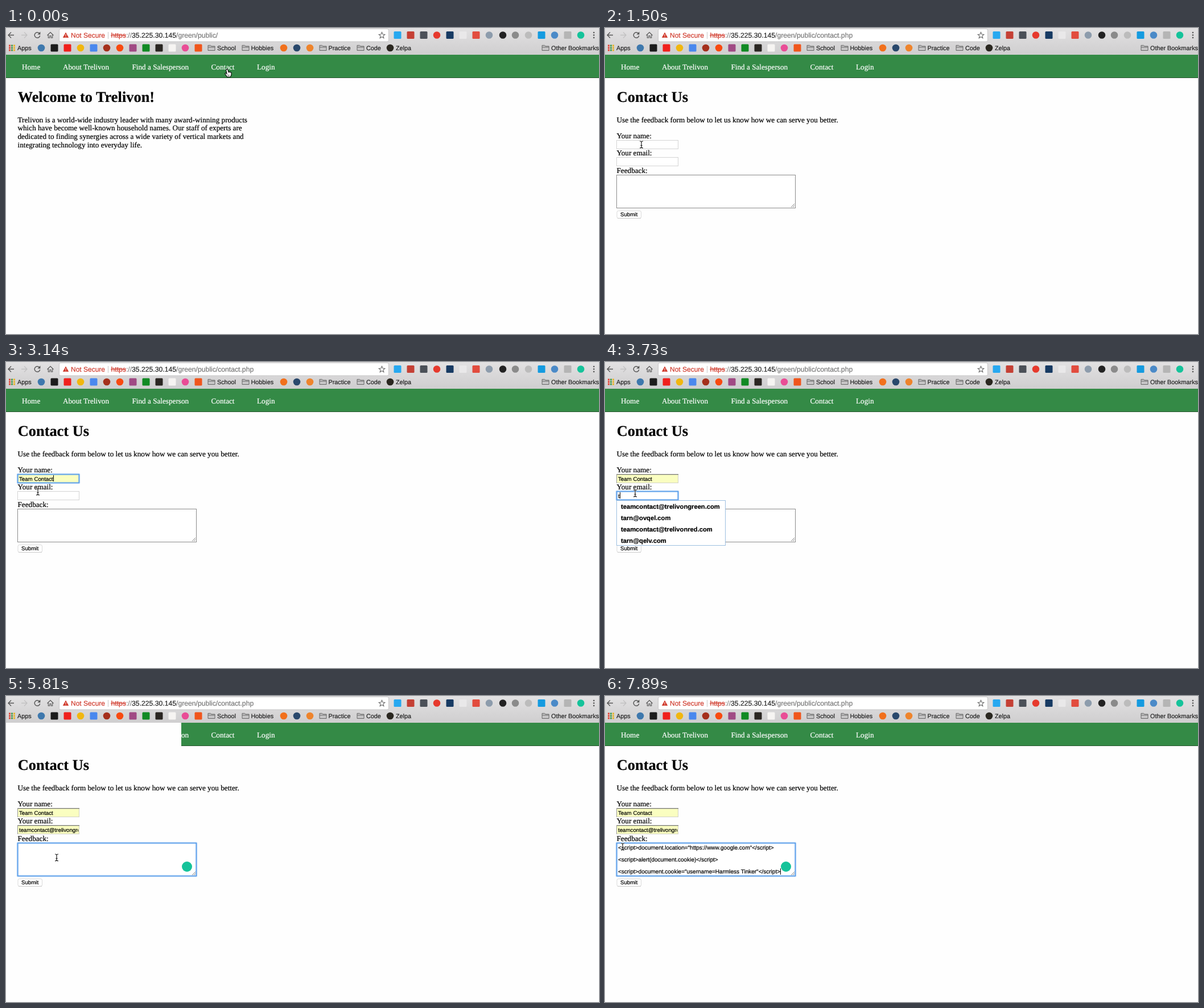
These frames come from a looping animation (1042x538 px, 8000 ms). An HTML page with a canvas:

```html
<!DOCTYPE html>
<html lang="en">
<head>
<meta charset="utf-8">
<title>Contact form</title>
<style>
  html, body { margin: 0; width: 100%; height: 100%; overflow: hidden; background: #fff; }
  canvas { display: block; }
</style>
</head>
<body>
<canvas id="stage" width="1042" height="538"></canvas>
<script>
const c = document.getElementById('stage').getContext('2d');
c.textRendering = 'geometricPrecision';
const LOOP = 8000;
const SERIF = '"Liberation Serif", serif', SANS = '"Liberation Sans", sans-serif';
const BODY = '13.2px ' + SERIF, HEAD = 'bold 26.4px ' + SERIF;
const URL_FONT = '12.2px ' + SANS, MARK = '10.8px ' + SANS;
const FIELD = '9.7px ' + SANS, CODE = '10px ' + SANS, MENU = 'bold 11.2px ' + SANS;
const YELLOW = '#fafec0', RING = '#5b9fea', MINT = '#15c39a';

const NAME = 'Team Contact', EMAIL = 'teamcontact@trelivongreen.com';
const NAMES = [NAME, 'team'];
const EMAILS = [EMAIL, 'tarn@ovqel.com', 'teamcontact@trelivonred.com', 'tarn@qelv.com'];
const INTRO = [
  'Trelivon is a world-wide industry leader with many award-winning products',
  'which have become well-known household names. Our staff of experts are',
  'dedicated to finding synergies across a wide variety of vertical markets and',
  'integrating technology into everyday life.'];
const SCRIPTS = [
  '<script>document.location="https://www.google.com"<\/script>',
  '<script>alert(document.cookie)<\/script>',
  '<script>document.cookie="username=Harmless Tinker"<\/script>'];

// pointer: start time, x, y, shape
const POINTER = [
  [0, 390, 79, hand], [470, 290, 150, arrow], [620, 131, 305, arrow],
  [910, 118, 288, beam], [1060, 96, 265, beam], [1200, 76, 222, arrow],
  [1350, 66, 207, beam], [1500, 64, 205, beam],
  [2690, 63, 214, arrow], [2840, 62, 222, arrow], [3130, 56, 228, beam], [3280, 53, 231, beam],
  [3880, 54, 238, beam], [4030, 54, 243, beam], [4180, 55, 248, arrow], [4330, 57, 252, arrow],
  [4630, 58, 254, beam], [4920, 62, 261, beam], [5070, 72, 271, beam], [5220, 82, 279, beam],
  [5360, 88, 283, beam], [5510, 89, 284, beam],
  [7300, 84, 281, beam], [7450, 70, 275, beam], [7590, 50, 268, beam],
  [7740, 36, 266, beam], [7890, 31, 265, beam]];

// a hairline outline gives the text its slightly heavier weight
function text(s, x, y, font, color = '#000') {
  c.font = font;
  c.fillStyle = c.strokeStyle = color;
  c.lineWidth = .2;
  c.fillText(s, x, y);
  c.strokeText(s, x, y);
  return x + c.measureText(s).width;
}
function box(x, y, w, h, color) {
  c.fillStyle = color;
  c.fillRect(x, y, w, h);
}
function frame(x, y, w, h, color, width = 1) {
  c.strokeStyle = color;
  c.lineWidth = width;
  c.strokeRect(x, y, w, h);
}
function round(x, y, w, h, r, fill, stroke) {
  c.beginPath();
  c.roundRect(x, y, w, h, r);
  c.fillStyle = fill;
  c.fill();
  if (stroke) { c.strokeStyle = stroke; c.lineWidth = 1; c.stroke(); }
}
function dot(x, y, r, color) {
  c.beginPath();
  c.arc(x, y, r, 0, 7);
  c.fillStyle = color;
  c.fill();
}
function path(d, x, y, stroke, width = 1, fill) {
  c.save();
  c.translate(x, y);
  const p = new Path2D(d);
  if (fill) { c.fillStyle = fill; c.fill(p); }
  if (stroke) { c.strokeStyle = stroke; c.lineWidth = width; c.stroke(p); }
  c.restore();
}

function hand(x, y) {
  path('M-2.5-6.5Q-1-7.5-.3-6L.8-2Q2-3 2.8-1.8Q4-2.5 4.5-1.2Q6-1.5 6 .5V3L4.5 7H-1.5L-5 1.5Q-5.3 0-3.6 .2L-2 1.6L-3.3-5Z',
    x, y, '#000', 1.1, '#fff');
  path('M.8-2L1.2 0M2.8-1.8L3.2 0M0 3V5.5M2 3V5.5', x, y, '#000', .7);
}
function arrow(x, y) {
  path('M0 0V11.5L2.7 9L4.6 13L6.5 12.2L4.7 8.3H8.4Z', x, y, '#fff', 1, '#000');
}
function beam(x, y) {
  const d = 'M-3-6Q-.5-6 0-4.5Q.5-6 3-6M0-4.5V4.5M-3 6Q-.5 6 0 4.5Q.5 6 3 6M-1.5 1.5H1.5';
  path(d, x, y, '#fff', 2.2);
  path(d, x, y, '#111', 1.1);
}

function folder(x) {
  path('M-6-4.5H-1.5L0-3H6V4.5H-6ZM-6-1.3H6', x, 35, '#666', 1, '#c6c5c6');
}
// plain stand-ins: [x, colour, 1 for a circle]
const BOOKMARKS = [
  [62, '#3e78ad', 1], [85, '#1c1c1c'], [108, '#f0201c'], [131, '#f1b70f', 1], [154, '#4a88ee'],
  [177, '#a5301c', 1], [200, '#f84a10', 1], [223, '#a04a84'], [246, '#118a24'], [269, '#2a2622'],
  [292, '#f6f4f2'], [315, '#e94d96', 1], [338, '#f0561c'], [488, '#f1701c', 1],
  [511, '#29486c', 1], [534, '#ee842c', 1], [675, '#2a2720', 1]];
const EXTENSIONS = [
  [688, '#27a8f0'], [711, '#c54035'], [734, '#4b5058'], [757, '#e6392d', 1], [780, '#173a63'],
  [803, '#e9e8e9'], [826, '#e24c3e'], [849, '#8d9cac', 1], [873, '#222', 1], [895, '#8a8a8a', 1],
  [918, '#bcbcbc', 1], [941, '#159be0'], [964, '#4b8ac8', 1], [987, '#b5b5b5'], [1010, MINT, 1]];
function badge([x, color, circle], y) {
  if (circle) dot(x, y, 6.3, color);
  else round(x - 6.5, y - 6.5, 13, 13, 1.5, color);
}

function browser(t) {
  const g = c.createLinearGradient(0, 0, 0, 47);
  g.addColorStop(0, '#e2e1e2');
  g.addColorStop(1, '#cfcecf');
  box(0, 0, 1042, 47, g);
  path('M5 0H-5M0-5L-5 0L0 5', 9, 12.5, '#555', 1.3);
  path('M-5 0H5M0-5L5 0L0 5', 32, 12.5, '#c2c1c2', 1.3);
  if (t >= 140 && t < 910) path('M-4.5-4.5L4.5 4.5M4.5-4.5L-4.5 4.5', 55, 12.5, '#555', 1.6);
  else {
    path('M3.4-3.4A4.8 4.8 0 1 0 4.7 1', 55, 12.5, '#555', 1.4);
    path('M5.4-6V-1H.4Z', 55, 12.5, null, 0, '#555');
  }
  path('M-5.5 .5L0-5L5.5 .5M-3.7-.5V4.7H-1.2V1.2H1.2V4.7H3.7V-.5', 78, 12.5, '#555', 1.1);

  round(93.5, 1.5, 579, 22.5, 2.5, '#fff', '#c6c5c6');
  path('M0-5L5.2 4.5H-5.2Z', 105, 12.5, null, 0, '#d03a2c');
  box(104.5, 11, 1, 3, '#fff');
  box(104.5, 15, 1, 1, '#fff');
  text('Not Secure', 114, 17, '12px ' + SANS, '#d03a2c');
  box(179, 7, 1, 12, '#c9c9c9');
  const end = text('https', 184.5, 17, URL_FONT, '#d03a2c');
  box(184, 12.5, end - 184, 1, '#d03a2c');
  let x = text('://', end, 17, URL_FONT, '#888');
  x = text('35.225.30.145', x, 17, URL_FONT, '#222');
  text('/green/public/' + (t < 470 ? '' : 'contact.php'), x, 17, URL_FONT, '#777');
  path('M0-5.3L1.5-1.7L5.3-1.4L2.4 1.1L3.3 4.9L0 2.8L-3.3 4.9L-2.4 1.1L-5.3-1.4L-1.5-1.7Z', 660.5, 12.8, '#666', 1.1);
  for (const e of EXTENSIONS) {
    const idle = e[0] === 873 && t >= 470 && t < 910;
    badge(idle ? [873, '#999', 1] : e, 12.5);
  }
  for (const y of [8, 12.5, 17]) dot(1033, y, 1.3, '#555');

  const hues = ['#e2483b', '#4c9a52', '#e9b52b', '#4b83d8'];
  for (let i = 0; i < 9; i++) box(5 + i % 3 * 4, 29.5 + (i / 3 | 0) * 4, 3, 3, hues[(i + (i / 3 | 0)) % 4]);
  for (const b of BOOKMARKS) badge(b, 35);
  for (const x of [361, 421, 557, 623, 948]) folder(x);
  for (const [s, x] of [['Apps', 20], ['School', 371], ['Hobbies', 430.5], ['Practice', 566.5],
    ['Code', 633], ['Zelpa', 685], ['Other Bookmarks', 958]]) text(s, x, 39, MARK, '#222');
}

function nav() {
  box(0, 47, 1042, 41, '#348a46');
  box(0, 87, 1042, 1, '#28582f');
  for (const [s, x] of [['Home', 28], ['About Trelivon', 100], ['Find a Salesperson', 221.5],
    ['Contact', 360.5], ['Login', 441]]) text(s, x, 72.7, BODY, '#fff');
}

function ring(x, y, w, h) {
  c.save();
  c.shadowColor = RING;
  c.shadowBlur = 1.5;
  frame(x, y, w, h, RING, 1.6);
  c.restore();
}
function caret(x, y, h = 11) { box(x, y, 1, h, '#000'); }

function field(y, value, filled, focused, caretOn) {
  box(20, y, 109, 16, filled ? YELLOW : '#fff');
  if (focused) ring(20.5, y + .5, 108, 15);
  else {
    frame(20.5, y + .5, 108, 15, filled ? '#d2d2c4' : '#d4d4d4');
    if (filled) {
      box(20, y, 109, 1.3, '#777');
      box(20, y, 1, 16, '#999');
    }
  }
  c.save();
  c.beginPath();
  c.rect(22, y + 1, 105, 14);
  c.clip();
  const x = text(value, 23, y + 11.8, FIELD);
  if (focused && caretOn) caret(Math.round(x), y + 2);
  c.restore();
}

function menu(y, w, items, hover) {
  const h = items.length * 19.8 + 1;
  box(20, y, w + 1, h, '#fff');
  if (hover) box(21, y + 1, w - 1, 20, '#dcdcdc');
  frame(20.5, y + .5, w, Math.round(h) - 1, '#9dbfe0');
  items.forEach((s, i) => text(s, 28, y + 15.3 + i * 19.8, MENU));
}

function feedback(t, focused) {
  box(20, 258, 315, 59, '#fff');
  if (focused) ring(20.5, 258.5, 314, 58);
  else frame(20.5, 258.5, 314, 58, '#8b8b8b');
  path('M-6 0L0-6M-3 0L0-3', 333, 315, '#777', .9);
  if (!focused) return;
  if (t >= 6850) {
    let x;
    SCRIPTS.forEach((s, i) => x = text(s, 23, 269.5 + i * 21.4, CODE));
    caret(Math.round(x), 303);
  } else if (t < 5810 || t >= 6260) caret(23, 261);
  dot(318, 300, 9, MINT);
}

function contact(t) {
  const focus = t < 1650 ? '' : t < 3280 ? 'name' : t < 5510 ? 'email' : 'text';
  text('Contact Us', 20.7, 129.5, HEAD);
  text('Use the feedback form below to let us know how we can serve you better.', 20.5, 165.5, BODY);
  text('Your name:', 20.5, 193.7, BODY);
  text('Your email:', 20.5, 224.2, BODY);
  text('Feedback:', 20.5, 254.7, BODY);

  const named = t >= 2840, mailed = t >= 4180;
  field(197, named ? NAME : t >= 2400 ? 't' : '', named, focus === 'name', t < 2100 || t >= 2400);
  field(227, mailed ? EMAIL : t >= 3730 ? 't' : '', mailed, focus === 'email', t >= 3430);
  feedback(t, focus === 'text');

  round(21, 321.5, 42.5, 13, 2.5, '#fff', '#dadada');
  box(22, 334, 41, 1, '#c8c8c8');
  text('Submit', 27, 331.3, '9.7px ' + SANS);

  if (t >= 2400 && t < 2990) menu(213, 108, NAMES, named);
  if (t >= 3730 && t < 4630) menu(243, 191, EMAILS, mailed);
}

function home() {
  text('Welcome to Trelivon!', 20.7, 129.5, HEAD);
  INTRO.forEach((s, i) => text(s, 20.5, 165.5 + i * 14.9, BODY));
}

function draw(now) {
  const t = now % LOOP;
  box(0, 0, 1042, 538, '#fefefe');
  browser(t);
  nav();
  // brief repaint gap over the left of the menu
  if (t >= 5810 && t < 6260) box(0, 47, 308, 41, '#fefefe');
  if (t < 910) home();
  else contact(t);
  const [, x, y, shape] = POINTER.findLast(p => p[0] <= t);
  shape(x, y);
  requestAnimationFrame(draw);
}
requestAnimationFrame(draw);
</script>
</body>
</html>
```
